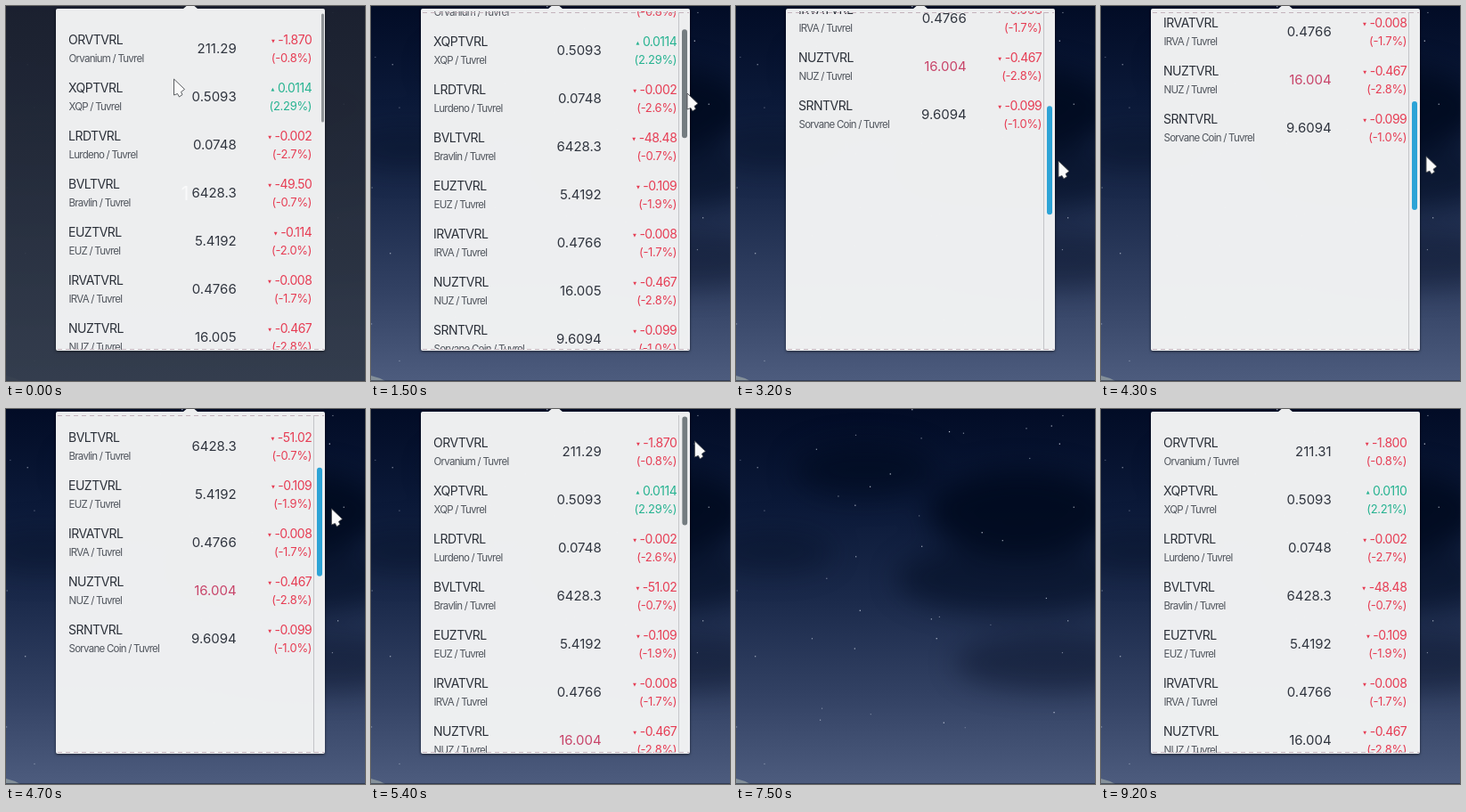
These frames come from a looping animation (403x421 px, 10 s). An HTML page:

```html
<!DOCTYPE html>
<html lang="en">
<head>
<meta charset="utf-8">
<title>Price ticker</title>
<style>
  html, body { margin: 0; width: 100%; height: 100%; overflow: hidden; background: #061129; }
  svg { display: block; width: 403px; height: 421px; font-family: Inter, sans-serif; }
  .code { font-size: 14px; letter-spacing: -.5px; fill: #2a2f38; }
  .name { font-size: 11.5px; letter-spacing: -.75px; fill: #50555d; }
  .price { font-size: 15px; fill: #30353f; text-anchor: end; }
  .price.flash { fill: #c8456a; }
  .change { font-size: 14px; letter-spacing: -.5px; text-anchor: end; }
  .percent { font-size: 13px; letter-spacing: -.3px; text-anchor: end; }
  .mark { font: 5px "DejaVu Sans", sans-serif; }
  .down { fill: #e63d54; }
  .up { fill: #27b391; }
  .dash { stroke: #c4b3bc; stroke-dasharray: 5 4; }
</style>
</head>
<body>
<svg viewBox="0 0 403 421">
  <defs>
    <linearGradient id="sky" x2="0" y2="1">
      <stop offset="0" stop-color="#020c26"/>
      <stop offset=".25" stop-color="#0b1938"/>
      <stop offset=".5" stop-color="#1a294a"/>
      <stop offset=".75" stop-color="#314062"/>
      <stop offset="1" stop-color="#4d5c7e"/>
    </linearGradient>
    <linearGradient id="dusk" x2="0" y2="1">
      <stop offset="0" stop-color="#1d2230"/>
      <stop offset="1" stop-color="#323b4a"/>
    </linearGradient>
    <filter id="blur" x="-50%" y="-50%" width="200%" height="200%" color-interpolation-filters="sRGB">
      <feGaussianBlur stdDeviation="15"/>
    </filter>
    <filter id="shadow" color-interpolation-filters="sRGB">
      <feDropShadow dx="0" dy="1" stdDeviation="1.6" flood-opacity=".6"/>
    </filter>
    <clipPath id="view"><rect x="56" y="6" width="302" height="380"/></clipPath>
  </defs>

  <rect width="403" height="421" fill="url(#sky)"/>
  <g filter="url(#blur)" fill="#010a1e">
    <ellipse cx="145" cy="68" rx="80" ry="30" opacity=".6"/>
    <ellipse cx="320" cy="115" rx="105" ry="48" opacity=".85"/>
    <ellipse cx="310" cy="190" rx="130" ry="40" opacity=".5"/>
    <ellipse cx="40" cy="160" rx="70" ry="25" opacity=".3"/>
    <ellipse cx="355" cy="285" rx="110" ry="32" opacity=".38"/>
  </g>
  <g id="stars" fill="#dfe6f2"></g>
  <path d="M0 415Q9 417 16 421H0Z" fill="#85919a"/>
  <path d="M0 420.5H403" stroke="#1c2638" opacity=".6"/>
  <rect id="dim" width="403" height="421" fill="url(#dusk)"/>

  <g id="panel">
    <path d="M58 3H199L205 -2H209L215 3H356Q358 3 358 5V385Q358 387 356 387H58Q56 387 56 385V5Q56 3 58 3Z"
      fill="#f5f6f7" fill-opacity=".97" filter="url(#shadow)"/>
    <g clip-path="url(#view)"><g id="list"></g></g>
    <path id="topDash" class="dash" d="M58 7.5H357"/>
    <path class="dash" d="M58 385.5H357"/>
    <path id="track" d="M345.5 7V386" stroke="#c3c4c8"/>
    <rect id="thumb" height="122"/>
    <text id="ghost" x="201" y="218" font-size="22" text-anchor="middle" fill="#fff">1</text>
  </g>
  <path id="cursor" d="M0 0V18L4 16.5 6 20 9.5 17.5 8 14.5 12 11.5Z" fill="#fafafa" stroke="#4a4d52" stroke-width=".9"/>
</svg>
<script>
const LOOP = 10000, STEP = 100, ROW = 54;
// Moments at which quotes are refreshed
const FIRST = 900, SECOND = 2300, THIRD = 5700, FOURTH = 8200, LAST = 9200;
const $ = id => document.getElementById(id);

function add(parent, tag, attrs, text = '') {
  const node = document.createElementNS('http://www.w3.org/2000/svg', tag);
  for (const key in attrs) node.setAttribute(key, attrs[key]);
  node.textContent = text;
  return parent.appendChild(node);
}

function set(id, attrs) {
  for (const key in attrs) $(id).setAttribute(key, attrs[key]);
}

// A quote is constant, or a list: value, time, next value, time, next value ...
function valueAt(quote, t) {
  if (!Array.isArray(quote)) return quote;
  return quote.filter((_, i) => i % 2 === 0 && (i === 0 || t >= quote[i - 1])).pop();
}

let seed = 7;
function random() {
  seed = seed * 16807 % 2147483647;
  return seed / 2147483647;
}
for (let i = 0; i < 45; i++) {
  add($('stars'), 'rect', {
    x: random() * 403, y: 400 * random() ** 1.4, width: 1.2, height: 1.2, opacity: .3 + .6 * random()
  });
}

// code, name, price, change, percent, price is flashing
const rows = [
  ['ORV', 'Orvanium', ['211.29', THIRD, '211.30', FOURTH, '211.31'], ['-1.870', THIRD, '-1.770', FOURTH, '-1.800'], '(-0.8%)'],
  ['XQP', 'XQP', '0.5093', ['0.0114', FOURTH, '0.0110'], ['(2.29%)', FOURTH, '(2.21%)']],
  ['LRD', 'Lurdeno', '0.0748', '-0.002', ['(-2.7%)', FIRST, '(-2.6%)', THIRD, '(-2.7%)']],
  ['BVL', 'Bravlin', '6428.3', ['-49.50', FIRST, '-48.48', SECOND, '-51.02', FOURTH, '-48.48'], '(-0.7%)'],
  ['EUZ', 'EUZ', '5.4192', ['-0.114', FIRST, '-0.109'], ['(-2.0%)', FIRST, '(-1.9%)']],
  ['IRVA', 'IRVA', '0.4766', '-0.008', '(-1.7%)'],
  ['NUZ', 'NUZ', ['16.005', SECOND, '16.004'], '-0.467', '(-2.8%)', [false, SECOND, true, LAST, false]],
  ['SRN', 'Sorvane Coin', '9.6094', '-0.099', '(-1.0%)']
].map(([code, name, price, change, percent, flash], i) => {
  const g = add($('list'), 'g', { transform: `translate(0 ${i * ROW})` });
  const text = (cls, x, y, content) => add(g, 'text', { class: cls, x, y }, content);
  const trend = valueAt(change, 0)[0] === '-' ? 'down' : 'up';
  text('code', 70, 43, code + 'TVRL');
  text('name', 70.5, 63, name + ' / Tuvrel');
  const priceText = text('price', 258.7, 53);
  const changeText = text('change ' + trend, 343.3, 43);
  add(changeText, 'tspan', { class: 'mark', dy: -2 }, trend === 'up' ? '▲' : '▼');
  const changeValue = add(changeText, 'tspan', { dx: 4, dy: 2 });
  const percentText = text('percent ' + trend, 343.3, 63);
  return t => {
    priceText.textContent = valueAt(price, t);
    priceText.classList.toggle('flash', !!valueAt(flash, t));
    changeValue.textContent = valueAt(change, t);
    percentText.textContent = valueAt(percent, t);
  };
});

function draw(t) {
  const ease = (start, end) => {
    const p = Math.min(Math.max((t - start) / (end - start), 0), 1);
    return p * p * (3 - 2 * p);
  };
  rows.forEach(update => update(t));

  // Each gesture runs from 0 to 1 and shifts both the list and the cursor
  const wheel = ease(300, 900), approach = ease(200, 1500);
  const pull = ease(1900, 2400), pullMore = .8 * ease(2700, 2900) + .2 * ease(3100, 3200);
  const nudge = ease(3300, 3600), pushBack = ease(4200, 5300);
  const leave = ease(5300, 6200), exit = ease(6700, 7100);

  const scroll = 52 * wheel + 116 * pull + 136 * pullMore - 8 * nudge - 296 * pushBack;
  set('list', { transform: `translate(0 ${-Math.round(scroll)})` });
  set('topDash', { opacity: scroll > .5 ? 1 : 0 });

  const hover = ease(1200, 1500) - ease(5300, 5900);
  const dragging = t >= 1900 && t < 5300;
  set('track', { opacity: hover });
  set('thumb', {
    x: 354 - 5 * hover, y: 8.5 + scroll * .341, width: 3 + 3 * hover, rx: 1.5 + 1.5 * hover,
    fill: dragging ? '#2ca3d6' : hover > .5 ? '#747c80' : '#8f9397',
    opacity: 1 - ease(7700, 8200)
  });

  const fade = 1 - Math.min(t / 1100, 1);
  set('dim', { opacity: .92 * fade });
  set('ghost', { opacity: .7 * fade });
  set('panel', { opacity: 1 - ease(7100, 7500) + ease(7500, 7700) });

  const x = 188.5 + 166.5 * approach + 2 * pull + 5 * pullMore + 3 * nudge + pushBack - 76 * leave - 65 * exit;
  const y = 82 + 16 * approach + 35 * pull + 41 * pullMore - 2 * nudge - 139 * pushBack + 85 * leave - 143 * exit;
  set('cursor', { transform: `translate(${x} ${y})` });
}

function tick() {
  const t = performance.now() % LOOP;
  draw(Math.floor(t / STEP) * STEP);
  requestAnimationFrame(tick);
}
tick();
</script>
</body>
</html>
```
